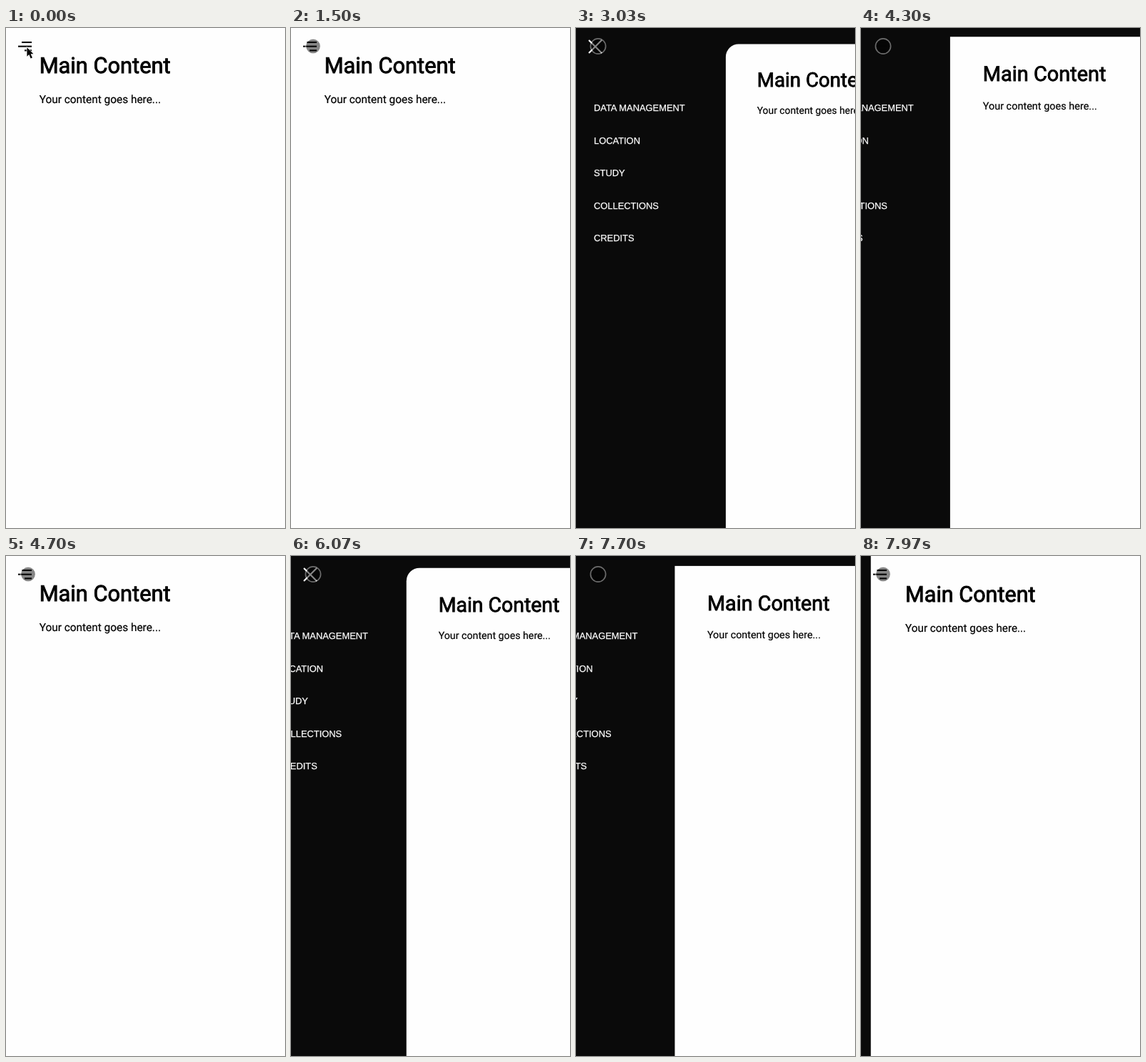
These frames come from a looping animation (391 by 699 pixels, 8000 ms). An HTML page:

```html
<!DOCTYPE html>
<html lang="en">
<head>
<meta charset="utf-8">
<title>Sliding menu</title>
<style>
  html, body { margin: 0; width: 100%; height: 100%; overflow: hidden; background: #0a0a0a; }
  svg { display: block; width: 391px; height: 699px; }
  text { text-rendering: geometricPrecision; }
  #menu { font: 12.9px "Liberation Sans", Arial, sans-serif; fill: #fff; stroke: #fff; stroke-width: 0.25px; }
  #page text { font-family: Roboto, sans-serif; fill: #000; stroke: #000; }
  .title { font-size: 30.8px; stroke-width: 0.9px; }
  .copy { font-size: 15.4px; stroke-width: 0.2px; }
  #icon { stroke-width: 2.1; }
</style>
</head>
<body>
<svg viewBox="0 0 391 699">
  <rect width="391" height="699" fill="#0a0a0a"/>
  <g id="menu">
    <text x="25" y="115.9">DATA MANAGEMENT</text>
    <text x="25" y="161.5">LOCATION</text>
    <text x="25" y="207.1">STUDY</text>
    <text x="25" y="252.7">COLLECTIONS</text>
    <text x="25" y="298.3">CREDITS</text>
  </g>
  <g id="page">
    <rect id="sheet" x="-2" y="-3" width="420" height="1000" fill="#fefefe"/>
    <text class="title" x="46.7" y="63">Main Content</text>
    <text class="copy" x="46.7" y="105">Your content goes here...</text>
  </g>
  <g id="icon"><line id="top"/><line id="mid" x1="17" x2="36" y1="25.7" y2="25.7"/><line id="low"/></g>
  <g id="touch">
    <circle cx="31" cy="25.5" r="10" fill="#000" fill-opacity=".47"/>
    <circle cx="31" cy="25.5" r="10.6" fill="none" stroke="#fff" stroke-opacity=".4" stroke-width="1.7"/>
  </g>
  <path id="arrow" d="M0 0V12.6L2.9 9.9L5.2 15.3L7.5 14.3L5.2 9.1H9Z"
        fill="#000" stroke="#fff" stroke-width="1.2" paint-order="stroke"/>
</svg>
<script>
const LOOP = 8000, SLIDE = 600, MORPH = 120;
// tap: icon and corners change; slide: the page starts to move
const moves = [
  { tap: 2170, slide: 2170, open: 1 },
  { tap: 4150, slide: 4153, open: 0 },
  { tap: 5770, slide: 5788, open: 1 },
  { tap: 7570, slide: 7570, open: 0 }
];
const bars = {
  top: { burger: [22, 20, 36, 20], cross: [18, 17, 36, 35] },
  low: { burger: [26, 31.4, 36, 31.4], cross: [18, 35, 36, 17] }
};

const $ = id => document.getElementById(id);
const set = (id, name, value) => $(id).setAttribute(name, value);
const clamp = v => Math.min(1, Math.max(0, v));
const mix = (a, b, k) => a + (b - a) * k;

// cubic-bezier(.25, .1, .25, 1)
function ease(x) {
  if (x <= 0 || x >= 1) return clamp(x);
  let lo = 0, hi = 1;
  for (let i = 0; i < 24; i++) {
    const u = (lo + hi) / 2;
    if (0.75 * u * (1 - u) + u ** 3 < x) lo = u; else hi = u;
  }
  const u = lo, v = 1 - u;
  return 0.3 * u * v * v + 3 * u * u * v + u ** 3;
}

function progress(t, key, span, curve) {
  let p = 0;
  for (const m of moves) if (t >= m[key]) p = mix(1 - m.open, m.open, curve((t - m[key]) / span));
  return p;
}

function drawIcon(k) {
  for (const id in bars) {
    const { burger, cross } = bars[id];
    ["x1", "y1", "x2", "y2"].forEach((name, i) => set(id, name, mix(burger[i], cross[i], k)));
  }
  const c = Math.round(mix(8, 255, k));
  set("icon", "stroke", `rgb(${c},${c},${c})`);
  set("mid", "opacity", 1 - k);
}

function draw(t) {
  let p = progress(t, "slide", SLIDE, ease);
  if (p < 0.005) p = 0;
  set("page", "transform", `translate(${211.7 * p} ${25.2 * p}) scale(${1 - 0.1 * p})`);
  set("menu", "transform", `translate(${-197 * (1 - p)} 0)`);
  const last = moves.filter(m => t >= m.tap).pop();
  set("sheet", "rx", last && last.open ? 20 : 0);
  drawIcon(progress(t, "tap", MORPH, clamp));

  const touch = t < 1430 ? 0 : t < 1470 ? 0.4 : t < 1500 ? 0.8 : 1;
  set("touch", "opacity", touch);
  set("arrow", "opacity", 1 - touch);
  const lift = t < 70 ? 0 : t < 100 ? 0.5 : 1;
  set("arrow", "transform", `translate(29.4 ${27.2 - lift})`);
}

const start = performance.now();
function tick() {
  draw((performance.now() - start) % LOOP);
  requestAnimationFrame(tick);
}
tick();
</script>
</body>
</html>
```
